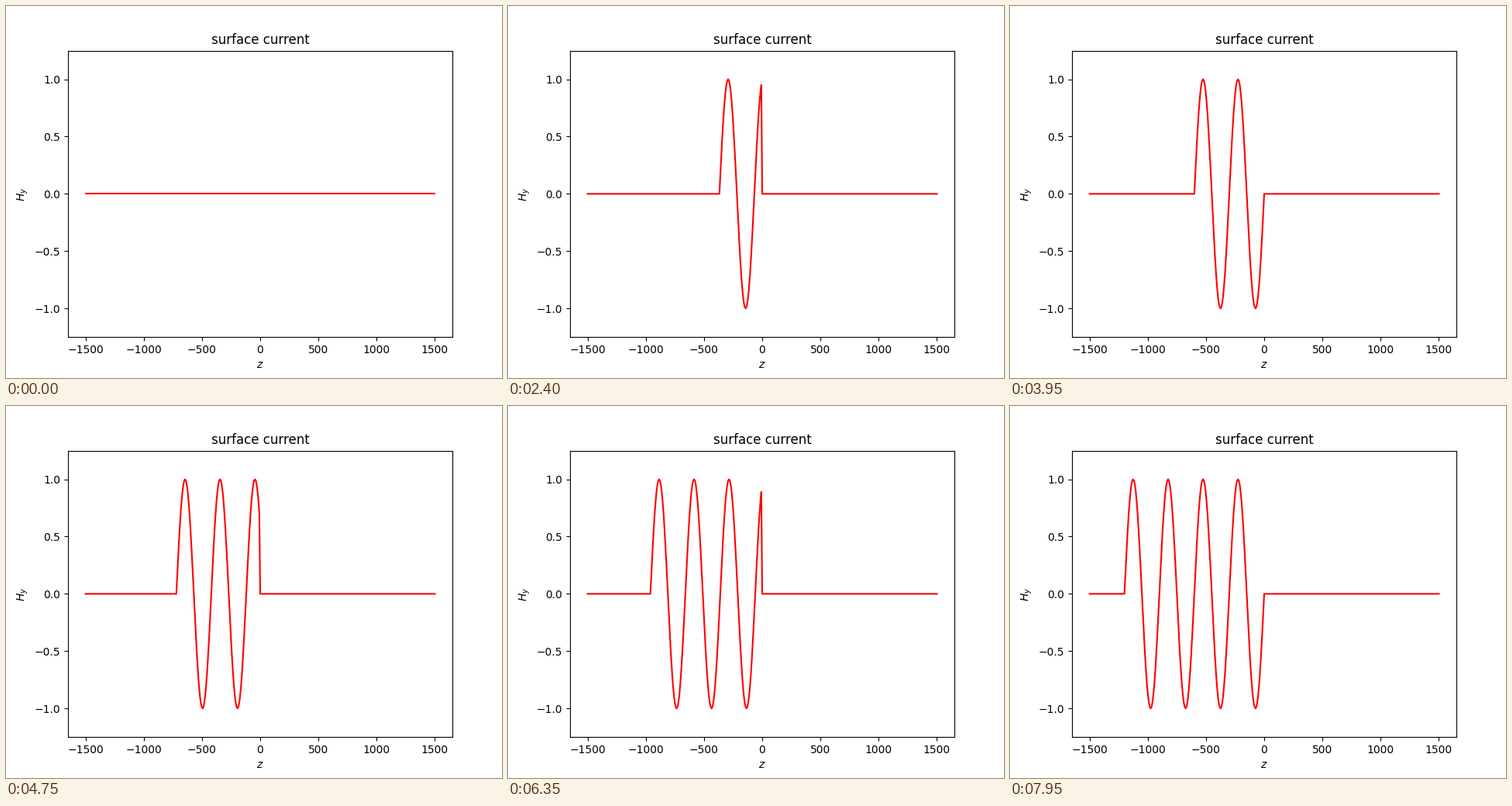
Recreate the animation shown at these times as a matplotlib script. Size 640 px wide and 480 px high, loop 8 s.

```python
import numpy as np
import matplotlib.pyplot as plt
from matplotlib.animation import FuncAnimation

FRAMES = 160
INTERVAL = 50
STEP = 7.5          # grid spacing and distance travelled per frame
WAVELENGTH = 300
HALF_WIDTH = 1500

z = np.linspace(-HALF_WIDTH, HALF_WIDTH, int(2 * HALF_WIDTH / STEP) + 1)


def field(frame):
    """Wave running to the left from a source at z = 0."""
    front = STEP * (frame + 1)
    inside = (z < 0) & (z > -front)
    return np.where(inside, np.sin(2 * np.pi * (z + front) / WAVELENGTH), 0.0)


fig, ax = plt.subplots(figsize=(6.4, 4.8), dpi=100)
line, = ax.plot(z, field(0), color="red", linewidth=1.5)
ax.set_xlim(-1.1 * HALF_WIDTH, 1.1 * HALF_WIDTH)
ax.set_ylim(-1.25, 1.25)
ax.set_title("surface current")
ax.set_xlabel("$z$")
ax.set_ylabel("$H_y$")


def update(frame):
    line.set_ydata(field(frame))
    return line,


anim = FuncAnimation(fig, update, frames=FRAMES, interval=INTERVAL,
                     repeat=True, repeat_delay=0, blit=False)
plt.show()
```
